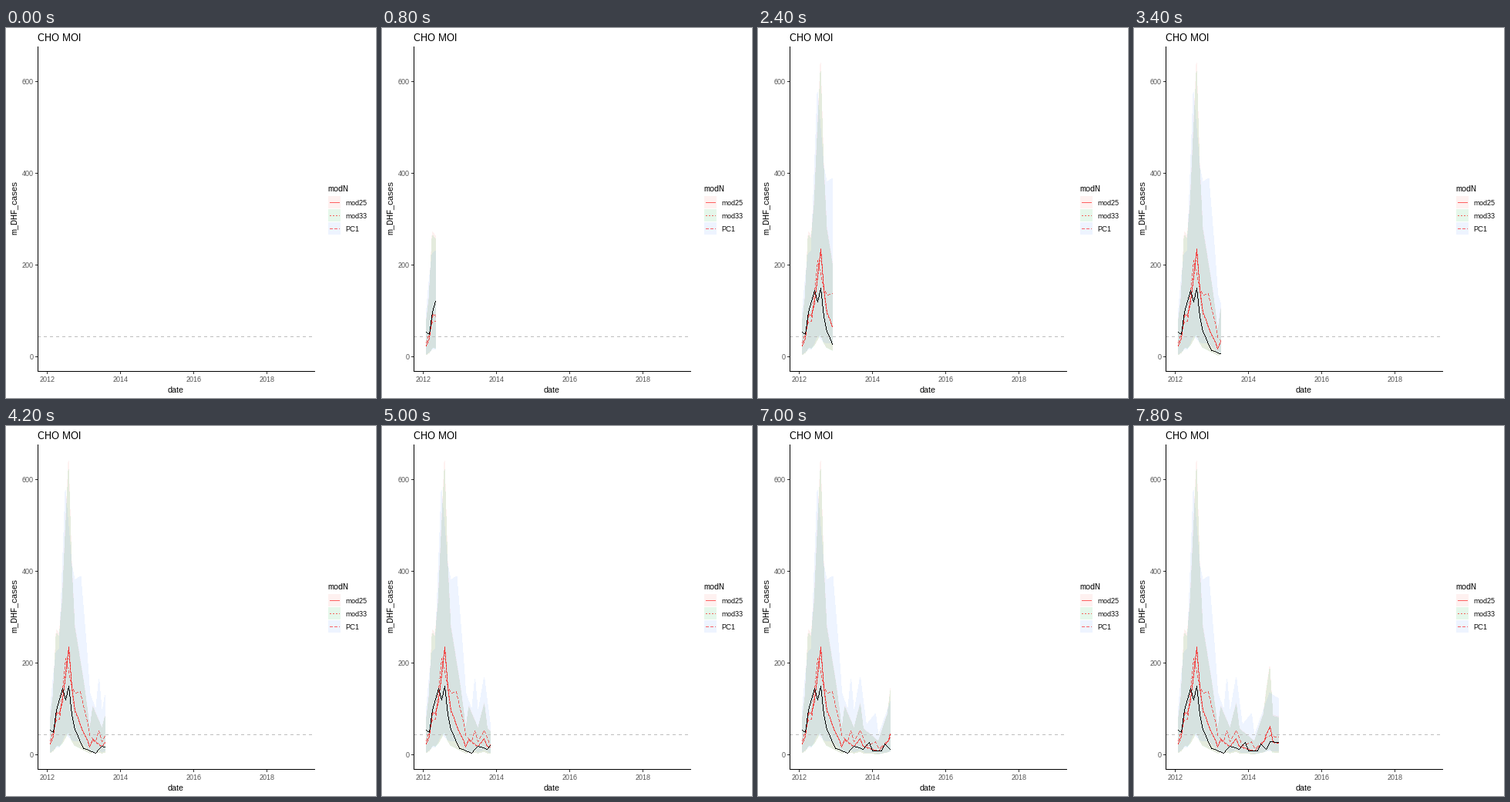
Write a matplotlib script that moves like this. It is 480 by 480 pixels and loops after 8 s.

```python
import numpy as np
import matplotlib.pyplot as plt
from matplotlib.animation import FuncAnimation
from matplotlib.collections import PolyCollection
from matplotlib.patches import Polygon, Rectangle

PX = 0.72  # points per pixel at 100 dpi
SQUARE = np.array([[0, 0], [1, 0], [1, 1], [0, 1]])
plt.rcParams.update({
    "font.family": "Liberation Sans",
    "text.hinting": "native",
    "text.hinting_factor": 1,
})

fig = plt.figure(figsize=(4.8, 4.8), dpi=100, facecolor="white")
ax = fig.add_axes([0, 0, 1, 1])
ax.set(xlim=(0, 480), ylim=(480, 0))
ax.axis("off")

# One value a month, February 2012 to November 2014
month = np.arange(1, 35)
start = np.datetime64("2012-01")
days = ((start + month).astype("datetime64[D]") - start.astype("datetime64[D]")).astype(int)
xs = 53.4 + days * 285 / 2192
# Each month falls on a whole step; steps in between are interpolated
step = np.round((month - 1) * 99 / 83)


def trend(*turns):
    """Monthly values along straight lines between (month, value) turns."""
    return np.interp(month, *zip(*turns))


def upper(mean):
    return np.minimum(2.6 * mean + 30, 3.2 * mean)


def lower(mean):
    return 0.22 * mean


def ypx(v):
    return 426.5 - 0.595 * v


cases = trend((1, 53), (2, 48), (3, 98), (5, 144), (6, 120), (7, 149), (8, 88),
              (9, 54), (12, 14), (16, 4), (18, 19), (21, 12), (23, 27),
              (24, 9), (27, 9), (28, 23), (30, 11), (31, 29), (34, 27))
mod25 = trend((1, 24), (2, 41), (3, 93), (4, 90), (5, 120), (7, 235), (8, 148),
              (9, 97), (14, 17), (15, 33), (18, 18), (20, 35), (21, 18),
              (26, 9), (29, 28), (31, 62), (32, 27), (34, 26))
pc1 = trend((1, 30), (3, 75), (4, 77), (6, 210), (8, 148), (9, 135), (11, 138),
            (14, 42), (16, 30), (17, 52), (18, 28), (20, 53), (22, 20),
            (25, 28), (26, 13), (31, 42), (34, 38))


def text(x, y, s, size, color="black", **kw):
    ax.text(x, y, s, fontsize=size * PX, color=color, **kw)


def box(x, y, w, h, color, **kw):
    ax.add_patch(Rectangle((x, y), w, h, fc=color, ec="none", lw=0,
                           antialiased=False, **kw))


def trace(x, y, dash):
    """Unit squares of a one pixel wide line through the points."""
    on, off = dash
    px, py = np.floor(x), np.floor(y)
    length = np.maximum(abs(np.diff(px)), abs(np.diff(py)))
    along = np.append(0, np.cumsum(length))
    i = np.arange(along[-1] + 1)
    i = i[i % (on + off) < on]
    corner = np.column_stack([np.interp(i, along, px), np.interp(i, along, py)])
    return np.floor(corner + 0.5)[:, None] + SQUARE


def stroke(color, z, alpha=1, squares=()):
    layer = PolyCollection(squares, fc=color, ec="none", lw=0, alpha=alpha,
                           antialiased=False, zorder=z)
    ax.add_collection(layer, autolim=False)
    return layer


# Axes
box(41, 24, 1, 422, "black", zorder=6)
box(41, 445, 360, 1, "black", zorder=6)
for i, year in enumerate(range(2012, 2020, 2)):
    box(53 + 95 * i, 446, 1, 3, "#333333")
    text(53.3 + 95 * i, 459, str(year), 9, "#4D4D4D", ha="center")
for v in range(0, 800, 200):
    box(38, ypx(v) - 0.5, 3, 1, "#333333")
    text(36, ypx(v) + 3.5, str(v), 9, "#4D4D4D", ha="right")
stroke("#BEBEBE", 3, 1, trace([41, 396], [400, 400], (4, 4)))

text(41, 17, "CHO MOI", 13)
text(220.5, 473, "date", 11, ha="center")
text(15.5, 233, "m_DHF_cases", 11, rotation=90, ha="right", va="center")
text(417.5, 212, "modN", 11)

# Models: name, tint, dash, mean
models = [
    ("mod25", "#F8766D", (1, 0), mod25),
    ("mod33", "#00BA38", (2, 2), 0.97 * mod25),
    ("PC1", "#619CFF", (4, 2), pc1),
]
bands, curves = [], []
for i, (name, tint, dash, mean) in enumerate(models):
    y = 226 + 17 * i
    box(418, y - 8, 16, 16, tint, alpha=0.1)
    stroke("red", 4, 0.6, trace([420, 432], [y, y], dash))
    text(440.5, y + 4, name, 9)
    band = Polygon([[0, 0], [0, 0], [0, 0]], fc=tint, ec="none", lw=0,
                   alpha=0.1, antialiased=False, zorder=2)
    ax.add_patch(band)
    bands.append((band, ypx(lower(mean)), ypx(upper(mean))))
    curves.append((stroke("red", 4, 0.6), ypx(mean), dash))
curves.append((stroke("black", 5), ypx(cases), (1, 0)))


def reveal(y, k):
    return np.append(y[step < k], np.interp(k, step, y))


def update(k):
    x = reveal(xs, k)
    for band, low, high in bands:
        up = np.column_stack([x, reveal(high, k)])
        down = np.column_stack([x, reveal(low, k)])[::-1]
        band.set_xy(np.vstack([up, down]))
        band.set_visible(k > 0)
    for curve, y, dash in curves:
        curve.set_verts(trace(x, reveal(y, k), dash))
        curve.set_visible(k > 0)
    return [b[0] for b in bands] + [c[0] for c in curves]


anim = FuncAnimation(fig, update, frames=40, interval=200, repeat=True,
                     repeat_delay=0, blit=False)
plt.show()
```
